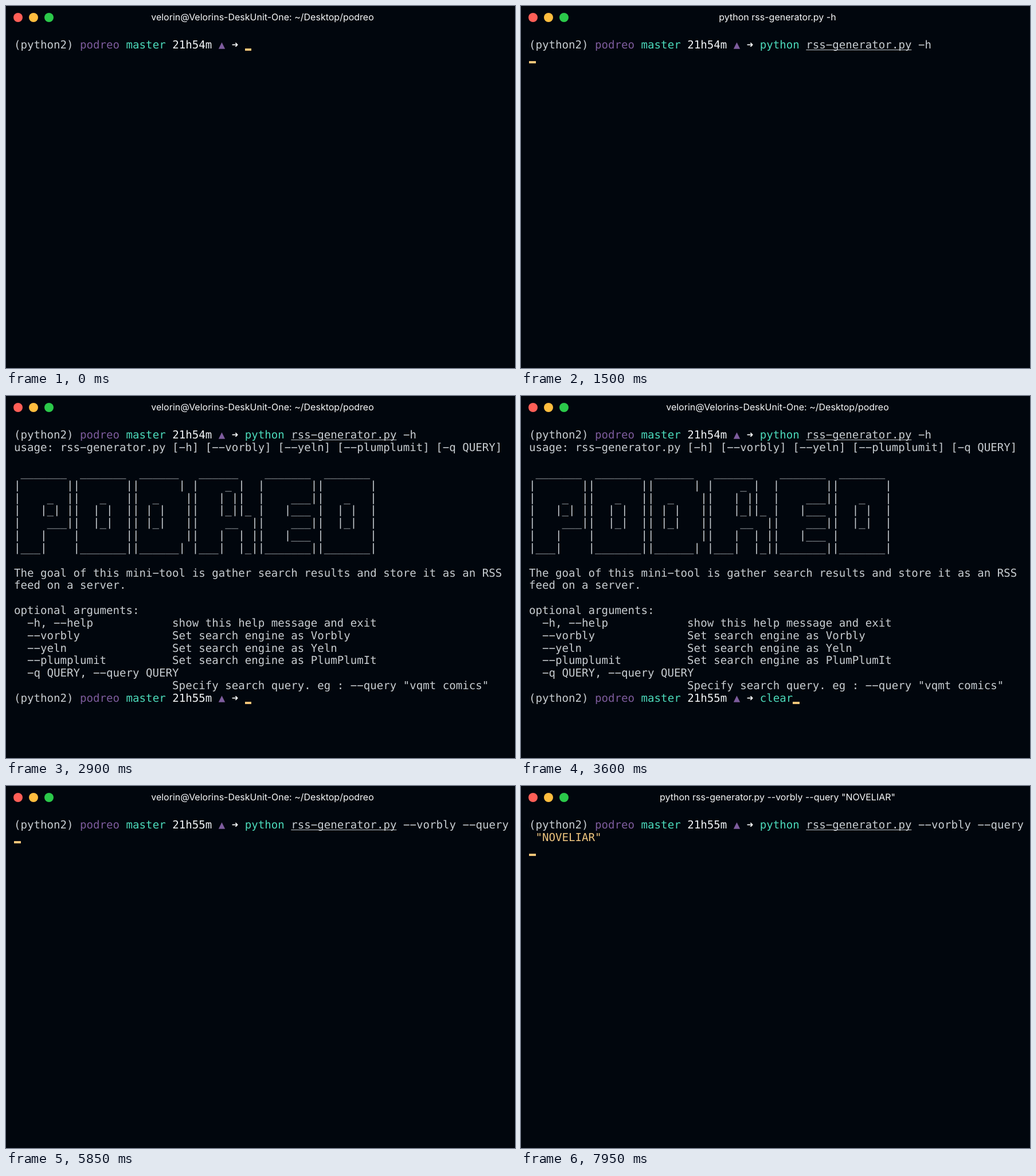
An HTML page for the animation above (8 s loop, 888 px wide and 631 px high).

```html
<!DOCTYPE html>
<html lang="en">
<head>
<meta charset="utf-8">
<title>Terminal</title>
<style>
  html, body { margin: 0; width: 100%; height: 100%; overflow: hidden; background: #01060d; }
  body { position: relative; text-rendering: geometricPrecision; }
  .light { position: absolute; top: 12px; width: 16px; height: 16px; border-radius: 50%; }
  #title {
    position: absolute; left: 0; top: 0; width: 895px;
    font: 16px/38px Inter, sans-serif; text-align: center; white-space: pre; color: #f8f9fa;
  }
  #screen {
    position: absolute; left: 14px; top: 57.3px; margin: 0;
    font: 19.12px/21.85px "DejaVu Sans Mono", monospace;
    font-variant-ligatures: none; white-space: pre; color: #c8cdd1;
  }
  .dir { color: #7d5c9d; }
  .ok { color: #4cdabb; }
  .bad { color: #ff5c57; font-weight: bold; }
  .clock { color: #f3f5f6; }
  .quote { color: #efc57f; }
  .file { text-decoration: underline 1px; text-underline-offset: 2px; text-decoration-skip-ink: none; }
  .cursor { display: inline-block; width: 1ch; height: 4px; vertical-align: -4px; background: #f2c478; }
</style>
</head>
<body>
<div class="light" style="left:12.5px;background:#ff5f57"></div>
<div class="light" style="left:40px;background:#ffbd3e"></div>
<div class="light" style="left:67px;background:#2bc94a"></div>
<div id="title"></div>
<pre id="screen"></pre>
<script>
const LOOP = 8000;
const INPUT_COLUMNS = 40; // room after the prompt before the line wraps
const HOME = 'velorin@Velorins-DeskUnit-One: ~/Desktop/podreo';
const SCRIPT = 'python rss-generator.py ';
const HELP = String.raw`usage: rss-generator.py [-h] [--vorbly] [--yeln] [--plumplumit] [-q QUERY]

 _______  _______  ______   ______    _______  _______
|       ||       ||      | |    _ |  |       ||       |
|    _  ||   _   ||  _    ||   | ||  |    ___||   _   |
|   |_| ||  | |  || | |   ||   |_||_ |   |___ |  | |  |
|    ___||  |_|  || |_|   ||    __  ||    ___||  |_|  |
|   |    |       ||       ||   |  | ||   |___ |       |
|___|    |_______||______| |___|  |_||_______||_______|

The goal of this mini-tool is gather search results and store it as an RSS
feed on a server.

optional arguments:
  -h, --help            show this help message and exit
  --vorbly              Set search engine as Vorbly
  --yeln                Set search engine as Yeln
  --plumplumit          Set search engine as PlumPlumIt
  -q QUERY, --query QUERY
                        Specify search query. eg : --query "vqmt comics"
`;

const span = (name, text) => `<span class="${name}">${text}</span>`;
const wideDash = text => text.replaceAll('-', '\u2212');

// Shell-style colouring: command, file name, quoted string.
function paint(text) {
  return wideDash(text).replace(/"[^"]*"?|^\S+|\brs\S*/g, word => {
    if (word[0] === '"') return span('quote', word);
    if (word.startsWith('rs')) return span('file', word);
    return span(/^(python|clear)$/.test(word) ? 'ok' : 'bad', word);
  });
}

function prompt(clock, command) {
  const wrap = command.length >= INPUT_COLUMNS ? '\n' : '';
  return `(python2) ${span('dir', 'podreo')} ${span('ok', 'master')} ${span('clock', clock)} ` +
    `${span('dir', '▲')} ${span('clock', '➜')} ` +
    paint(command.slice(0, INPUT_COLUMNS)) + wrap + paint(command.slice(INPUT_COLUMNS));
}

const steps = [];
let view = { title: HOME, history: '', clock: '21h54m', command: '', running: false };

function at(ms, change) {
  view = { ...view, ...change };
  steps.push({ ms, ...view });
}
function type(ms, gap, text) {
  [...text].forEach((char, i) => at(ms + i * gap, { command: view.command + char }));
}
const run = ms => at(ms, { title: view.command, running: true });

at(0, {});
type(100, 60, 'python rs');
at(700, { command: SCRIPT });
type(950, 100, '-h');
run(1250);
at(1600, {
  title: HOME, running: false, command: '', clock: '21h55m',
  history: prompt(view.clock, view.command) + '\n' + wideDash(HELP)
});

type(3050, 110, 'clear');
run(3800);
at(3850, { title: HOME, running: false, command: '', history: '' });

// Recall the earlier command, then trim its flag.
at(4050, { command: 'clear' });
at(4150, { command: SCRIPT + '-h' });
at(4300, { command: SCRIPT + '-' });
at(4350, { command: SCRIPT });
type(4500, 65, '--vorbly ');
type(5200, 90, '--query');
type(6050, 75, ' "NOVELIAR"');
run(7200);

const title = document.getElementById('title');
const screen = document.getElementById('screen');
const start = performance.now();
let shown;

function frame() {
  const time = (performance.now() - start) % LOOP;
  const step = steps.findLast(s => s.ms <= time);
  if (step !== shown) {
    shown = step;
    title.textContent = step.title;
    screen.innerHTML = step.history + prompt(step.clock, step.command) +
      (step.running ? '\n' : '') + '<i class="cursor"></i>';
  }
  requestAnimationFrame(frame);
}
frame();
</script>
</body>
</html>
```
